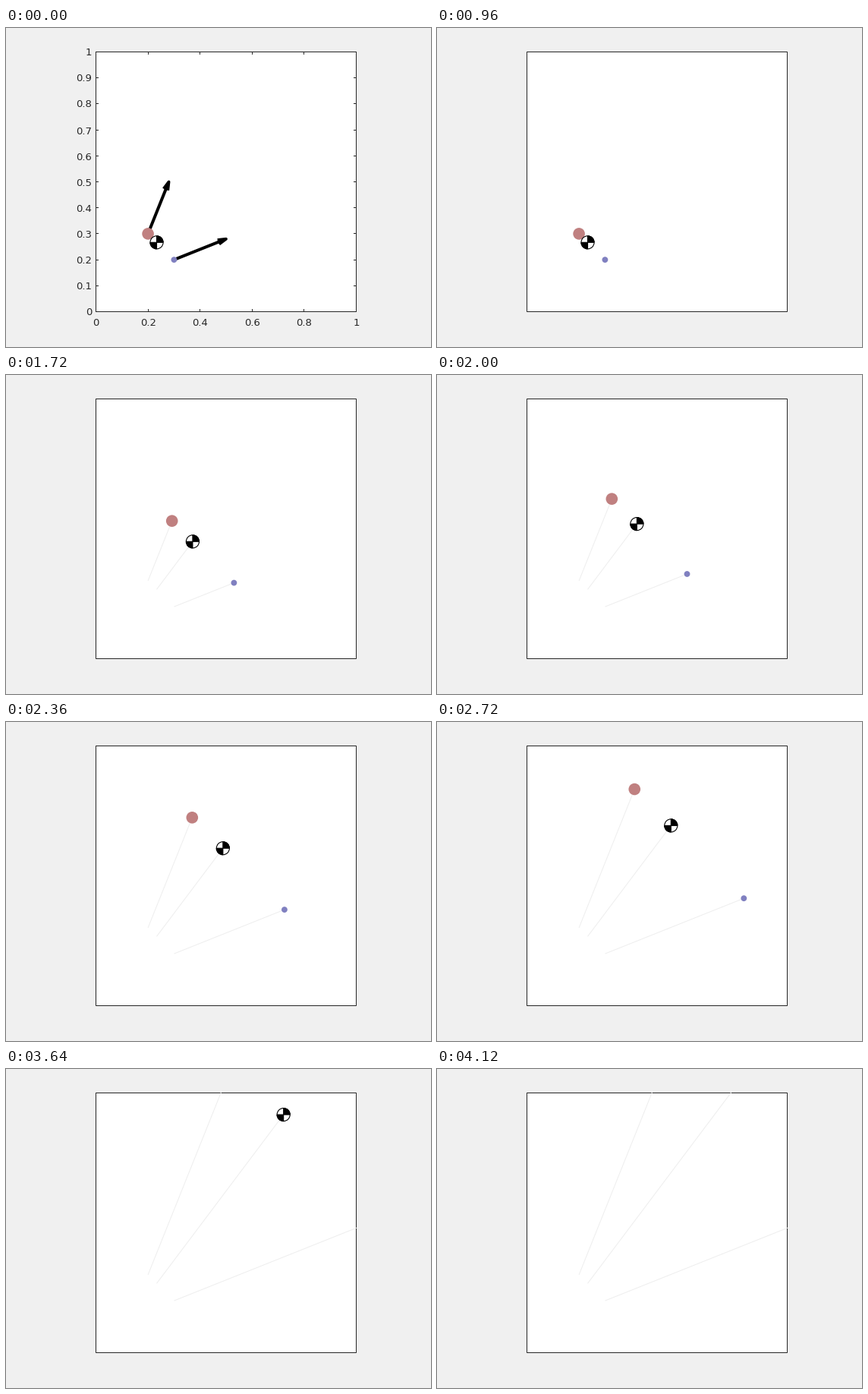
A matplotlib script that plays this animation: 560x420 px, repeating every 5600 ms.

```python
import numpy as np
import matplotlib.pyplot as plt
from matplotlib.animation import FuncAnimation
from matplotlib.patches import Circle, Rectangle, Wedge

W, H, DPI = 560, 420, 100
LEFT, RIGHT, TOP, BOTTOM = 118.5, 461.5, 31.5, 373.5
STEP_MS, FRAMES, HOLD = 40, 140, 24
DT = 6 / 99
INK = "#262626"
TRAIL = "#eeeeee"
PT = 72 / DPI  # points per pixel

fig = plt.figure(figsize=(W / DPI, H / DPI), dpi=DPI, facecolor="#f0f0f0")
ax = fig.add_axes([0, 0, 1, 1])
ax.set(xlim=(0, W), ylim=(H, 0))
ax.axis("off")


def to_px(p):
    """Map unit-square coordinates to stage pixels."""
    return np.array([LEFT + p[0] * (RIGHT - LEFT), BOTTOM - p[1] * (BOTTOM - TOP)])


def line(xs, ys, color=INK, width=1.0, **kw):
    kw = dict(solid_capstyle="butt", snap=False) | kw
    return ax.plot(xs, ys, color=color, lw=width * PT, **kw)[0]


def draw_box():
    # Edges already lie on pixel centres, so snapping would shift them.
    ax.add_patch(Rectangle((LEFT, TOP), RIGHT - LEFT, BOTTOM - TOP, fc="white",
                           ec=INK, lw=PT, snap=False, zorder=1))


def draw_ticks():
    size = 3.5
    parts = []
    font = dict(family="DejaVu Sans", fontsize=13.2 * PT, color=INK, va="baseline")
    for i in range(11):
        x, y = np.floor(to_px((i / 10, i / 10))) + 0.5
        label = f"{i / 10:g}"
        parts.append(ax.text(113, y + 5, label, ha="right", **font))
        parts.append(line([LEFT, LEFT + size], [y, y]))
        parts.append(line([RIGHT - size, RIGHT], [y, y]))
        if i % 2 == 0:
            parts.append(ax.text(x, 392, label, ha="center", **font))
            parts.append(line([x, x], [BOTTOM - size, BOTTOM]))
            parts.append(line([x, x], [TOP, TOP + size]))
    return parts


def draw_arrow(start, velocity):
    a, b = to_px(start), to_px(start + velocity)
    along = (b - a) / np.hypot(*(b - a))
    side = np.array([-along[1], along[0]])
    barbs = [b - 11 * along + s * 3 * side for s in (-1, 1)]
    shaft_end = b - 2 * along
    shaft = line([a[0], shaft_end[0]], [a[1], shaft_end[1]], "black", 4, zorder=3)
    head = line(*zip(barbs[0], b, barbs[1]), "black", 3.8,
                solid_joinstyle="round", zorder=3)
    return [shaft, head]


class Body:
    def __init__(self, start, velocity, color, radius):
        self.start, self.velocity = np.array(start), np.array(velocity)
        self.trail = line([], [], TRAIL, zorder=2.5)
        self.trail.set_clip_path(clip)
        self.parts = self.make_parts(color, radius)

    def make_parts(self, color, radius):
        return [ax.add_patch(Circle((0, 0), radius, fc=color, lw=0, zorder=4))]

    def is_visible(self, p):
        return 0 <= p[0] <= 1 and 0 <= p[1] <= 1

    def move(self, t):
        p = self.start + self.velocity * t
        a, b = to_px(self.start), to_px(p)
        self.trail.set_data([a[0], b[0]], [a[1], b[1]])
        for part in self.parts:
            part.set_center(b)
            part.set_visible(self.is_visible(p))


class MassCenter(Body):
    def make_parts(self, color, radius):
        edge = 1.1
        style = dict(ec=color, lw=edge * PT, zorder=5)
        disc = Circle((0, 0), radius - edge / 2, fc="white", **style)
        # The y axis points down, so these are the upper right and lower left.
        quarters = [Wedge((0, 0), radius - edge / 2, a, a + 90, fc=color, **style)
                    for a in (90, 270)]
        parts = [disc, *quarters]
        for part in parts:
            ax.add_patch(part)
            part.set_clip_path(clip)
        return parts

    def is_visible(self, p):
        return True


draw_box()
clip = Rectangle((LEFT - 0.5, TOP - 0.5), RIGHT - LEFT + 1, BOTTOM - TOP + 1,
                 transform=ax.transData)
heavy = Body((0.2, 0.3), (0.08, 0.2), "#c08080", 7.8)
light = Body((0.3, 0.2), (0.2, 0.08), "#8080c0", 3.9)
center = MassCenter((2 * heavy.start + light.start) / 3,
                    (2 * heavy.velocity + light.velocity) / 3, "black", 9.1)
bodies = [heavy, light, center]
intro = draw_ticks()
for body in (heavy, light):
    intro += draw_arrow(body.start, body.velocity)


def update(frame):
    for part in intro:
        part.set_visible(frame < HOLD)
    for body in bodies:
        body.move(max(frame - HOLD, 0) * DT)
    return []


anim = FuncAnimation(fig, update, frames=FRAMES, interval=STEP_MS,
                     init_func=lambda: [], repeat=True, repeat_delay=0)
plt.show()
```
